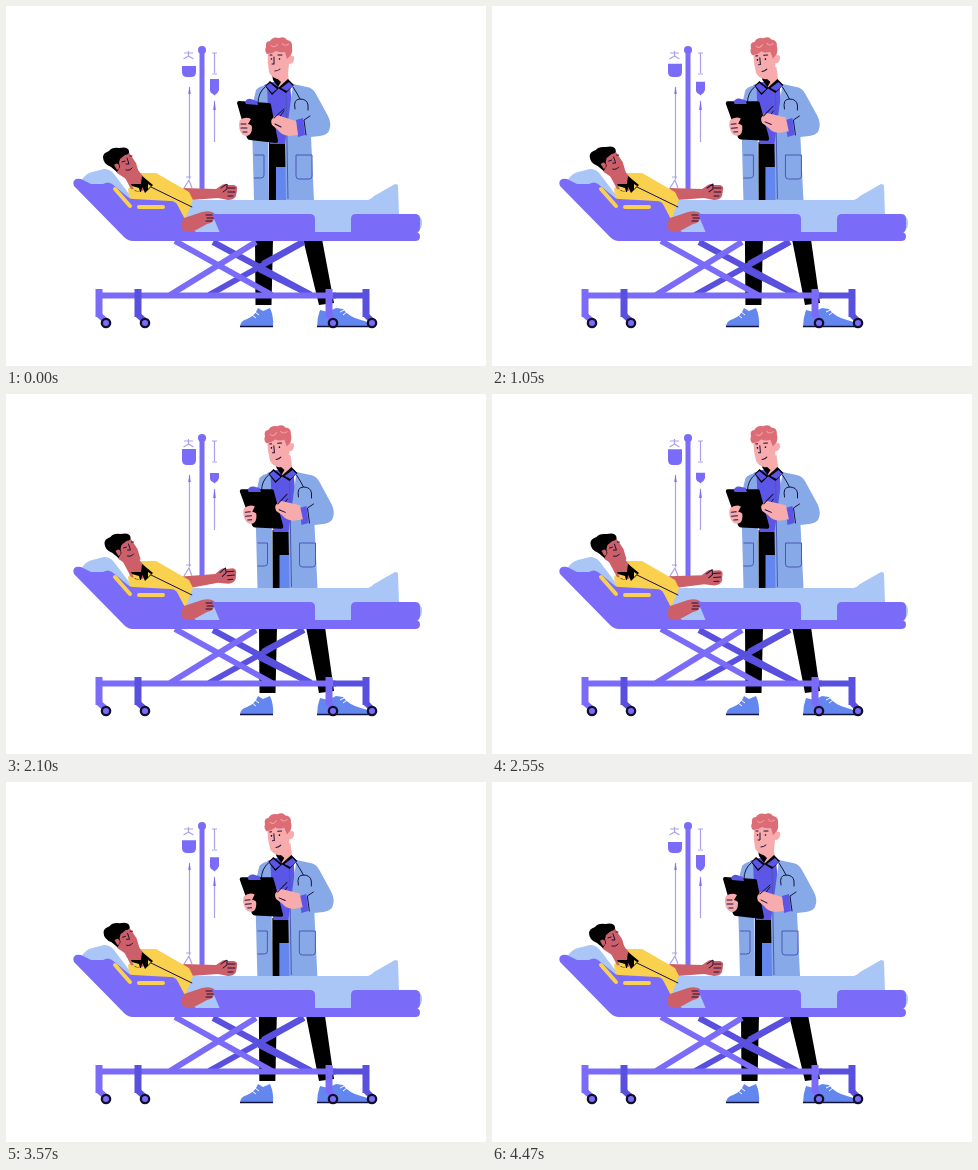
Animation, 480 px wide and 360 px high, one loop 4.5 s. Source, as an HTML page:

```html
<!DOCTYPE html>
<html lang="en">
<head>
<meta charset="utf-8">
<title>Bedside visit</title>
<style>
html, body { margin: 0; width: 100%; height: 100%; overflow: hidden; background: #fff }
svg { display: block; width: 100vw; height: 100vh }
.bed { fill: #7a6cf8 }
.deep { fill: #5b56e6 }
.sheet { fill: #a9c6f7 }
.coat { fill: #88a9e8 }
.skin { fill: #f8abad }
.tan { fill: #cd5f68 }
.shirt { fill: #fad04f }
.shoe { fill: #6487ef }
.line { fill: none; stroke: #17133c; stroke-width: 1; stroke-linecap: round; stroke-linejoin: round }
.seam { fill: none; stroke: #4b57b8; stroke-width: 1 }
.thin { fill: none; stroke: #aaa1ee; stroke-width: 1.2 }
.bar { fill: none; stroke: #7a6cf8; stroke-width: 6 }
.low { stroke: #5950df }
.slit { fill: none; stroke: #fad04f; stroke-width: 4; stroke-linecap: round }
</style>
</head>
<body>
<svg viewBox="0 0 480 360">
  <g id="drip">
    <path class="bed" d="M193.500 44h5V184h-5z"/>
    <circle class="bed" cx="196" cy="44" r="4"/>
    <path class="thin" d="M178 47h9M182.500 45v5l-5 3M182.500 50l5 3M183.500 81v92M177 186h10M180 171h5M178 182l5-8 3 8"/>
    <path class="thin" d="M206 47h5M208.500 47v20M206 68h5M208.500 95v41"/>
    <path class="bed" d="M183.500 80l1.200 8h-2.400zM208.500 94l1.300 10h-2.600z"/>
    <path class="bed" id="bagLeft"/>
    <path class="bed" id="bagRight"/>
  </g>

  <g id="doctor">
    <path id="legs"/>
    <path class="shoe" d="M234 321q0-6 7-8 8-3 11-11l5 3 7-3q4 9 3 19zM311 321q0-9 3-17l8 2 8-4 7 1q6 8 18 11 10 2 10 7z"/>
    <path fill="none" stroke="#14133a" stroke-width="1.500" d="M234 320.500h33M311 320.500h54"/>
    <path fill="none" stroke="#fff" d="M249 306l4 3M246 309l4 3M334 306l4-2M337 309l4-3"/>
    <g id="torso">
      <path d="M263 136h18v58h-18z"/>
      <path class="deep" d="M258 79l9-3 17 1 5 61h-25z"/>
      <path class="shoe" d="M270 161h11v33h-11z"/>
      <path class="coat" d="M261 79q-8 1-11 5-5 18-4 33l2 77h15l-1-90zM287 78l14 3q6 1 9 7l12 22q4 8 1 15-2 4-9 5l-9 1 3 63h-28l-1-56z"/>
      <path class="deep" d="M290 114l7-2 2 17-7 2z"/>
      <path class="line" d="M300 129l-2-15 6-4M272 113l6-8"/>
      <path class="seam" d="M280 82l2 111M248 149h10v20q0 3-3 3h-7M290 149h16v21q0 3-3 3h-10q-3 0-3-3z"/>
      <path class="skin" d="M265 67l16-6 2 15-9 7z"/>
      <path d="M259 80l5-5 9 7-7 7zM266 68l9 8-3 5-5-7zM272 82l10-9 6 6-8 8z"/>
      <path class="deep" d="M260 80l4-3 7 6-5 4zM275 82l8-6 4 4-6 5z"/>
      <path class="line" d="M259 81q-7 6-7 16M287 81q4 6 7 12M289 103q-2-10 5-10 7 0 8 6l0 5"/>
    </g>
    <g id="head">
      <path class="skin" d="M262 46l22-3 1 7q4-1 3 4-1 4-5 4l-1 10q-4 6-11 5-6-2-8-7-2-10-1-20z"/>
      <path fill="#dc6c75" d="M261 48q-3-3-1-7-1-6 4-6 3-5 9-3 6-2 8 2 6 1 5 7 1 6-2 9l-3 3-2-7q-5 1-9-1-4 3-9 3z"/>
      <path fill="none" stroke="#f3a1a6" d="M265 39q3 4 7-1M276 37q2 4 7 1"/>
      <path class="line" d="M268 51v7h-2M269 65q3 0 5-2M264 49h2M272 49h4"/>
      <circle cx="265.500" cy="53" r=".8"/><circle cx="273.500" cy="53" r=".8"/>
    </g>
    <g id="board">
      <path d="M231 97q0-2 2-2l30 2q2 0 2 2l7 36q0 2-2 2l-26-3q-2 0-3-2z"/>
      <path class="deep" d="M239 96q2-4 6-3l6 2 1 4-12-1z"/>
      <path class="skin" d="M234 114q6-4 11-1l-3 5q4 1 4 3 0 8-5 9-5 0-7-5-2-6 0-11z"/>
      <path class="line" d="M235 118h5M235 122h6M237 126h4"/>
      <path class="skin" d="M267 112q2-4 7-2l16 5 2 14-9 1q-8-1-11-6l-6-5q-2-5 1-7z"/>
      <path class="line" d="M268 112l10-9M269 118l6 3"/>
    </g>
  </g>

  <g id="bed">
    <path class="bar low" d="M207 236l98 53M298 236l-95 53"/>
    <path class="bar" d="M169 235l97 54M250 236l-86 53"/>
    <path class="bar low" d="M253 263l52 26M297 236l-40 22"/>
    <path class="bar" d="M91 289.500H330" stroke-width="7"/>
    <path class="bar low" d="M327 289.500H363" stroke-width="7"/>
    <g id="casters"></g>
    <path class="sheet" d="M75 175q4-7 11-9l12-3q6 0 10 5l25 33 48-4 6-3h174q3 0 7-4l21-12q3 0 3 2l1 29h15q8 0 8 8t-7 8H150l-45-37z"/>
  </g>

  <g id="patient">
    <g id="arm">
      <path class="tan" d="M177 182l33 1 6-4q3-2 6 0l6 0q4 1 3 5l-1 6q-2 4-8 4l-10-2-27 2z"/>
      <path class="line" d="M215 182l6-4v5l-4 3M222 182h7M222 186h7M222 190h5"/>
    </g>
    <path class="shirt" d="M122 183l13-16h15l33 19 4 8-8 20q-6 2-8-3l-6-9-40 1z"/>
    <path class="line" d="M145 181l41 20"/>
    <path class="tan" d="M116 166l15-3 10 12-4 10-12-2z"/>
    <g id="face">
      <path class="tan" d="M105 153l17-8 8 12 3 10-4 5-9 1-9-6z"/>
      <path d="M97 151q0-4 6-6 3-4 10-3 9-2 10 3 1 3-4 4l-5 4-1 4 1 4-3 5-6-5q-8-3-8-10z"/>
      <path class="tan" d="M108 159q3-3 5 0 1 4-2 5z"/>
      <path class="line" d="M121 152l2 6h-3M116 156l3-1M124 150h2M120 164q4 1 6-2"/>
    </g>
    <path d="M125 178l12 0-2 8-6-1zM136 170l11 9-8 8-4-9z"/>
    <path class="shirt" d="M126 180l7 2 1 4-6-2zM142 178l3 2-3 3z"/>
  </g>

  <g id="front">
    <path class="sheet" d="M187 194h20l108 14h78v19H180q6-8 6-17z"/>
    <path class="bed" d="M68 180q-2-5 2-7 4-1 7 1l8 4h12q5-3 9 0l16 13q2 2 5 2l37 2q6 0 8 5l11 21 7 5H409q5 0 5 4.500t-5 4.500H127q-5 0-9-4z"/>
    <path class="slit" d="M109 183l15 17M133 201h24"/>
    <path class="tan" d="M178 212l18-6q8-2 12 1 2 2 0 6-1 4-7 5l-11 6q-7 4-13 0-4-4 1-12z"/>
    <path class="line" d="M200 209h7M201 212h7M200 215h6"/>
    <path class="bed" d="M206 208h98q5 0 5 5v14h-95zM317 227q0-4 0-1h28v-13q0-5 5-5h59q5 0 5 5v8q0 6-5 6z"/>
  </g>
</svg>
<script>
const LOOP = 4500;
const el = id => document.getElementById(id);
const set = (id, name, value) => el(id).setAttribute(name, value);
const ease = x => (x = Math.min(1, Math.max(0, x)), x * x * (3 - 2 * x));

el('casters').innerHTML = [
  [93, 100, ''], [132, 139, 'low'], [323, 327, ''], [360, 366, 'low']
].map(([x, wheel, shade]) => `
  <path class="bar ${shade}" style="stroke-width: 7" d="M${x} 283V311"/>
  <path class="bar ${shade}" d="M${x} 309L${wheel} 315"/>
  <circle cx="${wheel}" cy="317" r="5.300" fill="#11102b"/>
  <circle cx="${wheel}" cy="317" r="3" class="bed"/>`).join('');

function draw(t) {
  const wave = (1 - Math.cos(2 * Math.PI * t / LOOP)) / 2;
  const sway = ease(t / 1150) - ease((t - 3450) / 1000);
  const lift = ease((t - 1000) / 1000) - ease((t - 2200) / 800);

  // Fluid levels move in opposite directions.
  set('bagLeft', 'd', `M176 ${60 - 5 * wave}H190V66q0 5-5 5h-4q-5 0-5-5z`);
  set('bagRight', 'd', `M204 ${73 + 6 * wave}H213V84q-1 3-3 4l-1.500 1.500-1.500-1.500q-3-1-3-4z`);

  const hip = 4 * sway;
  set('legs', 'd', `M${249 + hip} 233h18L${265.5 + hip} 299h-16zM${297 + 3 * sway} 233h19L328 297l-15 2z`);
  set('torso', 'transform', `translate(${3.5 * sway})`);
  set('head', 'transform', `translate(${sway}) rotate(${-5 * sway} 275 65)`);
  set('board', 'transform', `translate(${4 * sway} ${-sway}) rotate(${-4 * sway} 252 115)`);

  set('face', 'transform', `translate(${1.5 * wave} ${-2 * wave})`);
  set('arm', 'transform', `rotate(${-6 * lift} 182 190)`);
}

function tick() {
  draw(performance.now() % LOOP);
  requestAnimationFrame(tick);
}
tick();
</script>
</body>
</html>
```
